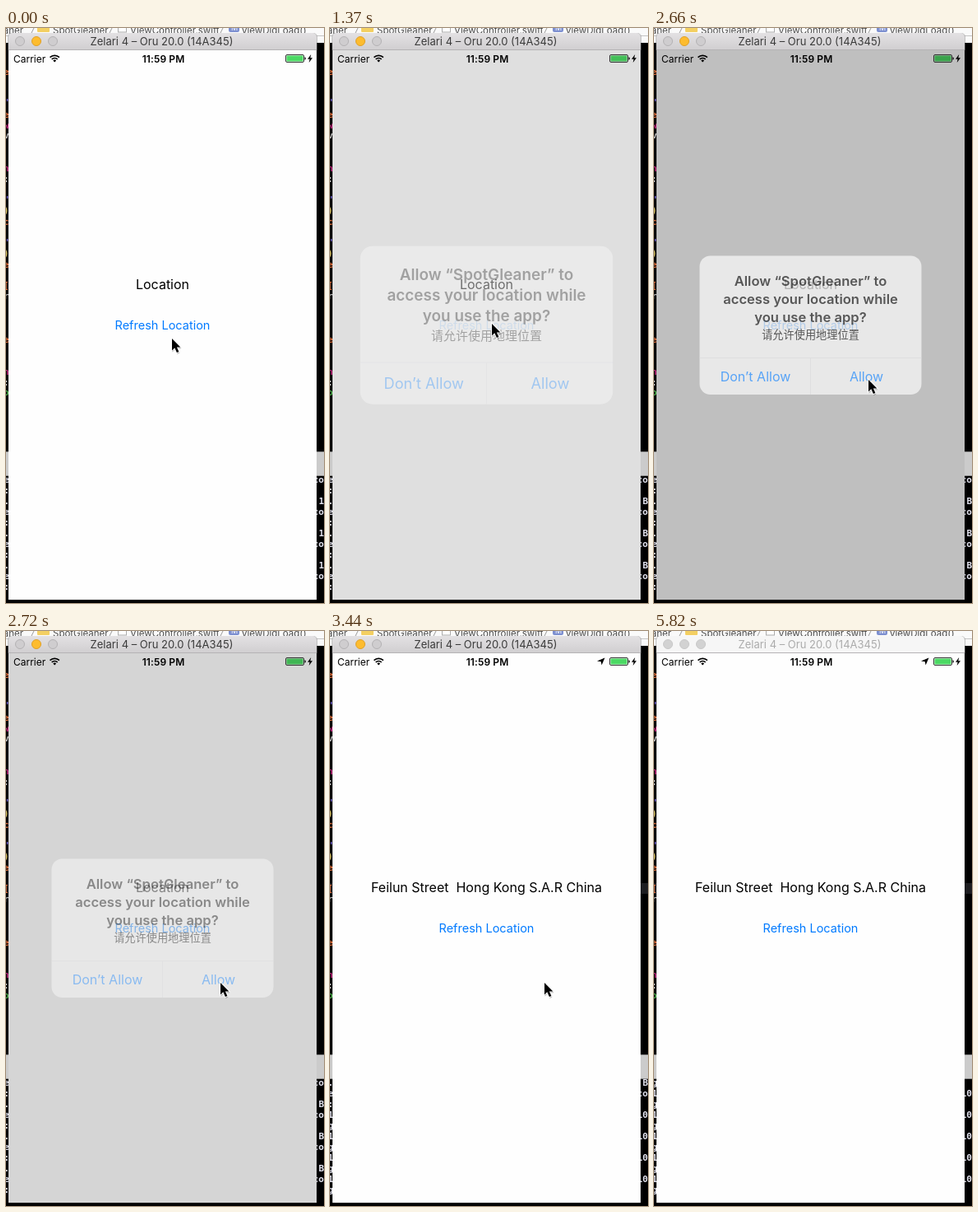
Recreate the animation shown at these times as an HTML page. Size 387 by 698 pixels, loop 5.89 s.

```html
<!DOCTYPE html>
<html lang="en">
<head>
<meta charset="utf-8">
<title>Location prompt</title>
<style>
html, body { margin: 0; width: 100%; height: 100%; overflow: hidden; background: #000; }
svg { display: block; width: 387px; height: 698px; }
text { font-family: Inter, Roboto, sans-serif; white-space: pre; }
.mid { text-anchor: middle; }
.body { font-size: 16px; }
.blue { fill: #007aff; }
.crumb { font-size: 11.5px; fill: #4c4c4c; }
.mono text { font: bold 11px "DejaVu Sans Mono", monospace; fill: #e4e4f0; }
.end { text-anchor: end; }
</style>
</head>
<body>
<svg viewBox="0 0 387 698">
  <defs>
    <linearGradient id="bar" x2="0" y2="1">
      <stop stop-color="#e3e1e3"/><stop offset="1" stop-color="#d0ced0"/>
    </linearGradient>
  </defs>

  <!-- desktop behind the window -->
  <rect width="387" height="698"/>
  <rect width="387" height="18" fill="#fafafa"/>
  <path d="M0 9.5H387" stroke="#c4c4c4"/>
  <g class="crumb">
    <text x="-10" y="7">eaner</text>
    <rect x="38" y="-5" width="15" height="10" rx="1" fill="#f3cf62"/>
    <text x="57" y="7">SpotGleaner</text>
    <rect x="136.5" y="-9" width="10" height="14" fill="#fff" stroke="#aaa"/>
    <text x="151" y="7">ViewController.swift</text>
    <rect x="271" y="-8" width="13" height="13" rx="2" fill="#7d8fd0"/>
    <text x="274" y="3" font-size="9" fill="#fff">M</text>
    <text x="287" y="7">viewDidLoad()</text>
    <path d="M31 6l3-6M126 6l3-6M261 6l3-6" stroke="#999" fill="none"/>
  </g>
  <rect id="lineMark" y="306" width="387" height="13" fill="#1d1d20"/>
  <g id="code" class="mono"></g>
  <rect y="515" width="387" height="29" fill="#cbcbcb"/>
  <path d="M0 514.5H387M0 543.5H387" stroke="#8c8c8c"/>
  <g id="terminal" class="mono"></g>

  <!-- simulator window -->
  <path d="M2 27V11a5 5 0 0 1 5-5H374a5 5 0 0 1 5 5V27" fill="#888" opacity=".5"/>
  <path id="titleBar" d="M3 27V11a5 5 0 0 1 5-5H373a5 5 0 0 1 5 5V27Z"/>
  <path d="M3 26.5H378" stroke="#b5b3b5"/>
  <g id="lights" stroke-width="1">
    <circle cx="17" cy="16" r="5.5"/><circle cx="37" cy="16" r="5.5"/><circle cx="57" cy="16" r="5.5"/>
  </g>
  <text id="title" class="mid" x="189.5" y="21" font-size="13">Zelari 4 – Oru 20.0 (14A345)</text>
  <rect x="3" y="27" width="375" height="667" fill="#fefefe"/>

  <text id="place" class="mid body" x="190.5" y="316.5"></text>
  <text id="refresh" class="mid blue" x="190.5" y="366" font-size="14.5">Refresh Location</text>

  <rect x="341.5" y="33.5" width="20" height="7" fill="#4cd964"/>
  <rect id="dim" x="3" y="27" width="375" height="667"/>

  <!-- status bar -->
  <text x="9" y="41.5" font-size="12">Carrier</text>
  <g fill="none" stroke="#000" stroke-width="1.7">
    <path d="M53.5 35.6a8.2 8.2 0 0 1 11.4 0M55.7 38a5 5 0 0 1 7 0"/>
    <path d="M57.3 39.4a2.8 2.8 0 0 1 3.8 0L59.2 41.4Z" fill="#000" stroke="none"/>
  </g>
  <text class="mid" x="191.5" y="41.5" font-size="12" font-weight="600" letter-spacing=".1">11:59 PM</text>
  <path id="arrow" d="M334.5 32.5L330.6 41.5L329.8 37.3L325 36.6Z"/>
  <rect x="340.5" y="32.5" width="22" height="9" rx="1.5" fill="none" stroke="#222" stroke-width=".9"/>
  <path d="M363.5 35.3q1.4 0 1.4 1.7t-1.4 1.7Z"/>
  <path d="M371.2 32L367 37.8H369.6L368.7 42L373 36.2H370.3Z"/>

  <!-- permission alert -->
  <g id="alert">
    <rect id="panel" x="55.5" y="276.5" width="270" height="168.5" rx="13" fill="#f8f8f8"/>
    <g id="alertText">
      <g class="mid" font-size="16.6" font-weight="600">
        <text x="190.5" y="312.5">Allow “SpotGleaner” to</text>
        <text x="190.5" y="334.5">access your location while</text>
        <text x="190.5" y="356.5">you use the app?</text>
      </g>
      <text class="mid" x="190.5" y="377" lang="zh-CN" style="font:13.2px 'Noto Sans CJK SC','Noto Sans CJK',sans-serif">请允许使用地理位置</text>
      <path d="M55.5 400.5H325.5M190.5 400.5V445" stroke="#d9d9db"/>
      <text class="mid body blue" x="123.5" y="429">Don’t Allow</text>
      <text class="mid body blue" x="258.5" y="429">Allow</text>
    </g>
  </g>

  <g id="cursor">
    <path d="M0 0V14.4L3.3 11.3L5.9 17L8.4 15.9L5.9 10.4H10.4Z" opacity=".25" transform="translate(.6 1.4)" stroke="#000"/>
    <path d="M0 0V14.4L3.3 11.3L5.9 17L8.4 15.9L5.9 10.4H10.4Z" stroke="#fff" stroke-width="1.8" paint-order="stroke"/>
  </g>
</svg>

<script>
const LOOP = 5890;
const el = id => document.getElementById(id);
const ramp = (t, from, to) => Math.min(1, Math.max(0, (t - from) / (to - from)));
const smooth = p => p * p * (3 - 2 * p);
const show = (node, on) => node.style.display = on ? '' : 'none';

function addText(parent, x, y, string, attrs = {}) {
  const node = document.createElementNS('http://www.w3.org/2000/svg', 'text');
  for (const [name, value] of Object.entries({ x, y, ...attrs })) node.setAttribute(name, value);
  node.textContent = string;
  parent.append(node);
}

// Line ends of the code editor that peek out left of the window
const inks = { o: '#e0703c', m: '#c2267d', w: '#c8c8c8', v: '#7a6ae0', y: '#c9b458', g: '#4bb04b' };
const codeEnds = `53oe 90v" 105oe 118mw 130wv 170mn 183w: 208v" 221y) 235oc 260v"
  273y) 287oe 312o[ 325wr 378oe 417mn 430w: 442go`;
for (const [, y, ink, char] of codeEnds.matchAll(/(\d+)(\w)(\S)/g))
  addText(el('code'), 3.5, +y + 4, char, { class: 'end', style: `fill:${inks[ink]}` });

// Terminal output on both sides: [start time, left ends, right ends]
const screens = [
  [0, 'e:.e:.e:.e:', 'co,,1,co,,1,co,,1,co,'],
  [1040, 'e:.e:.e:.e:', 'co,,B,co,,B,co,,B,co,'],
  [2850, '.e:1g1g1g1g', 'B,co,,10,,10,,10,,10,'],
  [4400, 'g1g1g1g1g1g', ',10,,10,,10,,10,,10,']
].map(([start, left, right]) => {
  const node = document.createElementNS('http://www.w3.org/2000/svg', 'g');
  [...left].forEach((char, i) => addText(node, 4, 552 + 13 * i, char, { class: 'end' }));
  right.split(',').forEach((word, i) => addText(node, 387, 552 + 13 * i, word, { class: 'end' }));
  el('terminal').append(node);
  return { start, node };
});

const cursorPath = [
  [300, 202, 377], [590, 197, 359], [1370, 197, 359], [1840, 272, 416], [2070, 261, 427],
  [3740, 261, 427], [4150, 223, 402], [4330, 223, 402], [4510, 208, 365],
  [5050, 208, 365], [5590, 333, 705]
];

function cursorAt(t) {
  const next = cursorPath.findIndex(point => point[0] > t);
  if (next < 0) return cursorPath.at(-1).slice(1);
  if (next === 0) return cursorPath[0].slice(1);
  const [t0, x0, y0] = cursorPath[next - 1], [t1, x1, y1] = cursorPath[next];
  const p = smooth(ramp(t, t0, t1));
  return [x0 + (x1 - x0) * p, y0 + (y1 - y0) * p];
}

function draw(t) {
  const active = t < 5820, located = t >= 2850;

  el('titleBar').setAttribute('fill', active ? 'url(#bar)' : '#f6f6f6');
  el('title').setAttribute('fill', active ? '#3a3a3a' : '#ababab');
  [...el('lights').children].forEach((light, i) => {
    const lit = active && i === 1;
    light.setAttribute('fill', lit ? '#fdbc2f' : active ? '#cfcdcf' : '#d2d2d2');
    light.setAttribute('stroke', lit ? '#e0a028' : active ? '#b4b2b4' : '#c8c8c8');
  });

  screens.forEach(({ start, node }, i) =>
    show(node, t >= start && t < (screens[i + 1]?.start ?? LOOP)));
  show(el('lineMark'), located);
  show(el('arrow'), located);
  el('place').textContent = located ? 'Feilun Street  Hong Kong S.A.R China' : 'Location';
  el('refresh').setAttribute('opacity', 1 - 0.78 * (ramp(t, 950, 1130) - ramp(t, 1400, 1650)));

  const enter = 1 - (1 - ramp(t, 1310, 1840)) ** 3;
  const shown = enter - smooth(ramp(t, 2490, 2900));
  const scale = 1.2 - 0.2 * enter;
  el('dim').setAttribute('opacity', 0.4 * shown);
  el('panel').setAttribute('opacity', shown ** 0.7);
  el('alertText').setAttribute('opacity', shown);
  el('alert').setAttribute('transform', `translate(190.5 360.75) scale(${scale}) translate(-190.5 -360.75)`);
  show(el('alert'), shown > 0);

  el('cursor').setAttribute('transform', `translate(${cursorAt(t)})`);
}

function tick() {
  draw(performance.now() % LOOP);
  requestAnimationFrame(tick);
}
tick();
</script>
</body>
</html>
```
